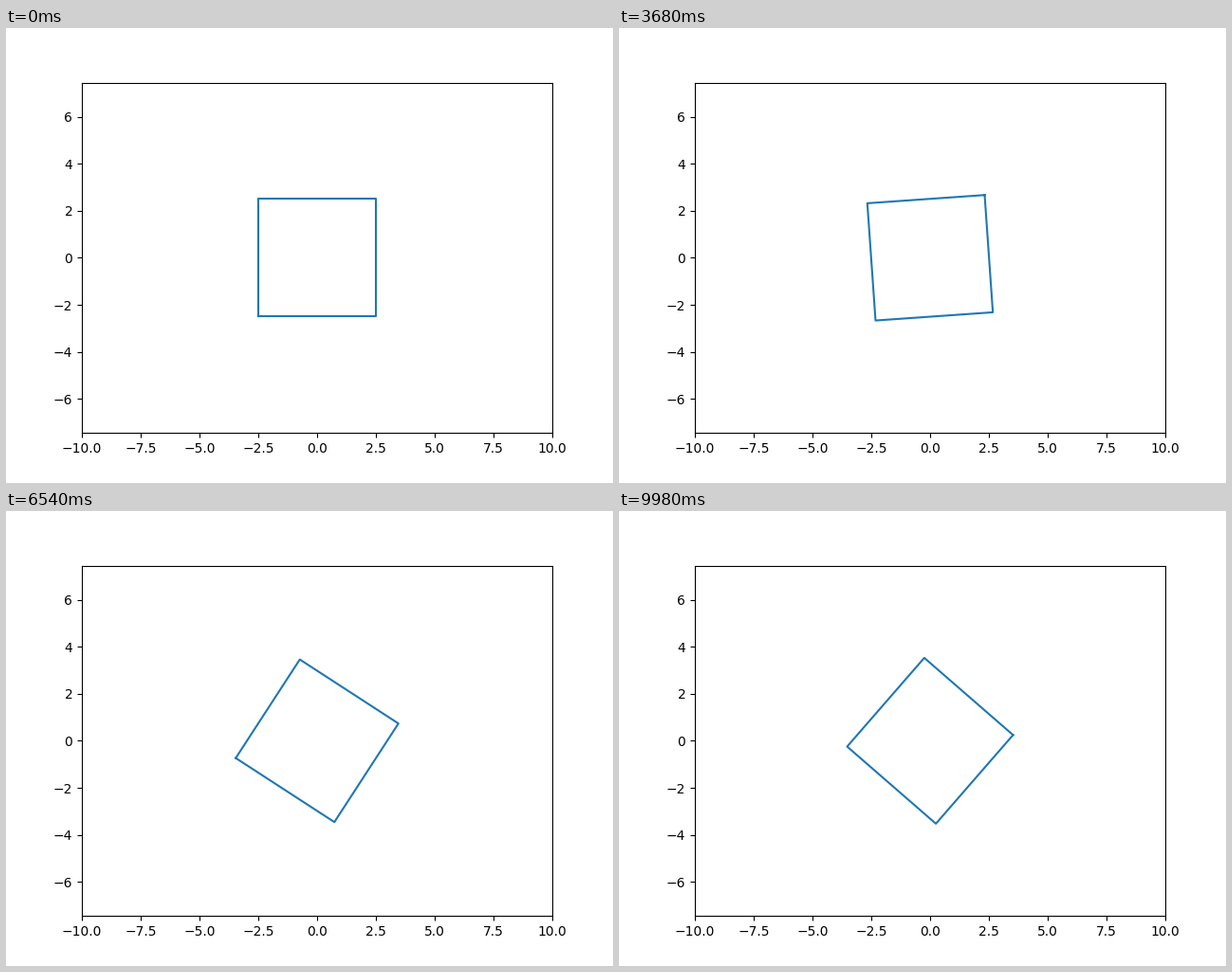
A matplotlib script that plays this animation: 640x480 px, repeating every 10000 ms.

```python
import numpy as np
import matplotlib.pyplot as plt
from matplotlib.animation import FuncAnimation

FRAMES = 500
INTERVAL = 20        # ms
STEP = 1             # degrees turned per frame, counter-clockwise
HALF = 2.5           # half the side of the square

fig, ax = plt.subplots(figsize=(6.4, 4.8), dpi=100)

# Same scale on both axes
box = ax.get_position()
x_half = 10
y_half = x_half * (box.height * 4.8) / (box.width * 6.4)
ax.set_xlim(-x_half, x_half)
ax.set_ylim(-y_half, y_half)

corners = HALF * np.array([[-1, 1, 1, -1, -1],
                           [-1, -1, 1, 1, -1]])
line, = ax.plot(*corners, color="C0", linewidth=1.5)


def rotate(points, degrees):
    a = np.radians(degrees)
    turn = np.array([[np.cos(a), -np.sin(a)],
                     [np.sin(a), np.cos(a)]])
    return turn @ points


def update(frame):
    line.set_data(*rotate(corners, frame * STEP))
    return line,


anim = FuncAnimation(fig, update, frames=FRAMES, interval=INTERVAL,
                     blit=True, repeat=True, repeat_delay=0)
plt.show()
```
